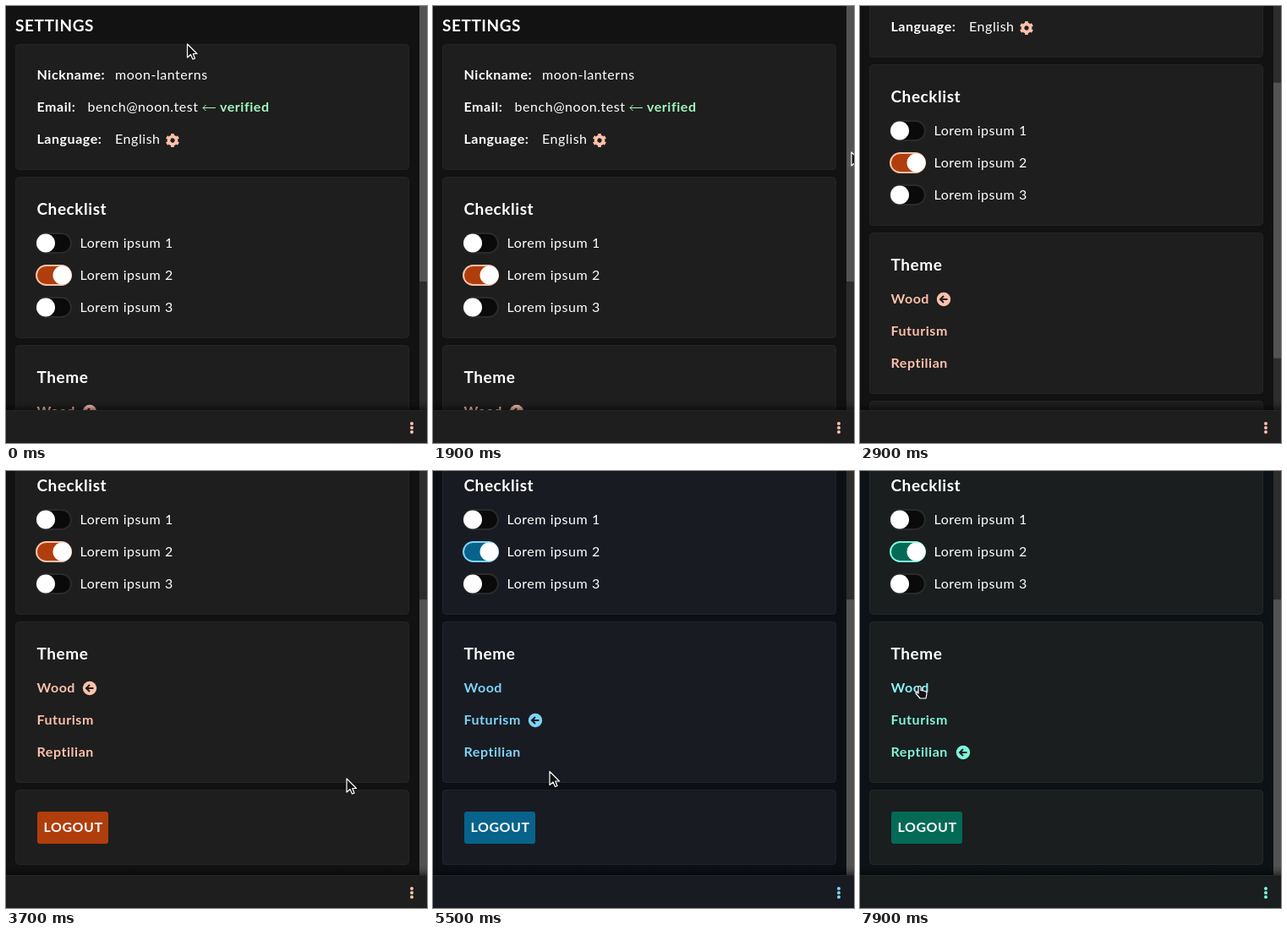
These frames come from a looping animation (498x517 px, 8 s). An HTML page:

```html
<!DOCTYPE html>
<html lang="en">
<head>
<meta charset="utf-8">
<title>Settings</title>
<style>
  html, body { margin: 0; width: 100%; height: 100%; overflow: hidden; background: #121212; }
  svg { display: block; width: 498px; height: 517px; background: var(--bg); }
  text { font: 16px Lato, sans-serif; letter-spacing: .55px; fill: #fff; white-space: pre; }
  .bold, .title, .link { font-weight: 700; }
  .title { font-size: 19px; }
  .link { fill: var(--accent); }
  .link.hover { fill: var(--hover); }
  .panel { fill: var(--panel); stroke: var(--line); }
  .accent { fill: var(--accent); }
  .main { fill: var(--main); }
  .track { fill: #0a0a0a; stroke: #2a2a2a; stroke-width: 2; }
  .track.on { fill: var(--main); stroke: var(--accent); }
  .verified { fill: #a3f7bf; }
  .cursor path { fill: #111; stroke: #fff; stroke-width: 1.2; stroke-linejoin: round; }
</style>
</head>
<body>
<svg id="stage" viewBox="0 0 498 517"></svg>
<script>
const LOOP = 8000, STEP = 100, VIEW = 478, CONTENT = 701;

const themes = {
  wood: { bg: '#121212', panel: '#1e1e1e', line: '#252525', main: '#b03e0d', accent: '#fdc1a9', hover: '#ffe1d3' },
  futurism: { bg: '#0c1015', panel: '#191b22', line: '#22252c', main: '#07638b', accent: '#7dd3f8', hover: '#b2e9ff' },
  reptilian: { bg: '#0c1215', panel: '#1a1e1e', line: '#232828', main: '#046a56', accent: '#7ff5dc', hover: '#8ff0ff' }
};
const links = [
  { name: 'Wood', right: 83, badge: 99, y: 480 },
  { name: 'Futurism', right: 104, badge: 121, y: 518 },
  { name: 'Reptilian', right: 106, badge: 122, y: 556 }
];

// [time, value...]
const scrollKeys = [[2200, 0], [2300, 40], [2400, 108], [2600, 108], [2700, 127],
  [2900, 133], [3100, 146], [3200, 170], [3400, 223]];
const cursorKeys = [[500, 214.5, 45], [1900, 495, 173], [2200, 495, 173], [2300, 500, 200],
  [3400, 500, 324], [3600, 497, 324], [3700, 403, 364], [4400, 74, 291], [4600, 72, 291],
  [5000, 150, 58], [5400, 144, 355], [5500, 138, 355.5], [6000, 80, 330], [6100, 80, 330],
  [6500, 186, 316], [7000, 160, 273], [7900, 70, 254.5]];

const linear = p => p;
const easeOut = p => 1 - (1 - p) ** 2;

function sample(keys, time, ease) {
  const next = keys.findIndex(key => key[0] > time);
  if (next === 0) return keys[0].slice(1);
  if (next < 0) return keys.at(-1).slice(1);
  const from = keys[next - 1], to = keys[next];
  const p = ease((time - from[0]) / (to[0] - from[0]));
  return from.slice(1).map((v, i) => v + (to[i + 1] - v) * p);
}

const text = (x, y, label, cls = '') => `<text class="${cls}" x="${x}" y="${y}">${label}</text>`;
const panel = (y, h) => `<rect class="panel" x="11.5" y="${y}" width="465" height="${h}" rx="4"/>`;
const toggle = (y, on, label) => `
  <rect class="track ${on ? 'on' : ''}" x="36" y="${y - 11.5}" width="41" height="23" rx="11.5"/>
  <circle cx="${on ? 66.5 : 47}" cy="${y}" r="11" fill="#fff"/>` + text(87.5, y + 5.5, label);

const gear = `<g transform="translate(197 159) rotate(15)" fill="none" stroke="var(--accent)">
  <circle r="4.5" stroke-width="3.8"/>
  <circle r="6.8" stroke-width="2.6" pathLength="12" stroke-dasharray="1 1"/></g>`;

const stage = document.getElementById('stage');
stage.innerHTML = `
  <defs><linearGradient id="shade" x2="0" y2="1">
    <stop stop-opacity="0"/><stop offset=".5" stop-opacity=".12"/><stop offset="1" stop-opacity=".45"/>
  </linearGradient></defs>
  <g id="content">
    ${text(11, 30, 'SETTINGS', 'title')}
    ${panel(45.5, 148)}${panel(202.5, 190)}${panel(401.5, 190)}${panel(600.5, 88)}
    ${text(36.5, 87, 'Nickname:', 'bold')}${text(129, 87, 'moon-lanterns')}
    ${text(36.5, 125, 'Email:', 'bold')}${text(96.5, 125, 'bench@noon.test')}
    <path d="M248 120.5H233m3.500-3.500l-3.500 3.500l3.500 3.500" fill="none" stroke="#a3f7bf"/>
    ${text(253, 125, 'verified', 'bold verified')}
    ${text(36.5, 163, 'Language:', 'bold')}${text(129, 163, 'English')}${gear}
    ${text(36.5, 247, 'Checklist', 'title')}
    ${[1, 2, 3].map(n => toggle(242.5 + 38 * n, n === 2, 'Lorem ipsum ' + n)).join('')}
    ${text(36.5, 446, 'Theme', 'title')}
    ${links.map(link => text(36.5, link.y + 5, link.name, 'link')).join('')}
    <g id="badge"><circle class="accent" r="8.2"/>
      <path d="M4.5 0H-4m4-4l-4 4l4 4" fill="none" stroke="var(--panel)" stroke-width="2"/></g>
    <rect class="main" x="37" y="626" width="84" height="38" rx="3"/>
    ${text(44.5, 650, 'LOGOUT', 'bold')}
  </g>
  <rect x="489" width="9" height="${VIEW}" fill="#2d2d2d"/>
  <rect id="thumb" x="489" width="9" height="326" fill="#535353"/>
  <rect y="466" width="498" height="12" fill="url(#shade)"/>
  <rect class="panel" x="-1" y="478.5" width="500" height="40"/>
  ${[494, 499, 504].map(y => `<circle class="accent" cx="480" cy="${y}" r="2"/>`).join('')}
  <g id="cursor" class="cursor">
    <path id="arrow" d="M0 0V16L4 12.5L6.5 18L9 17L6.8 11.5H11.5Z"/>
    <path id="hand" d="M-1 1q1.5-2 3 0v4l5 1q2 .5 2 3l-1 5.500h-7l-5-6q0-2 2-1l1 1z"/>
  </g>`;

const byId = id => document.getElementById(id);
const [content, badge, thumb, cursor, arrow, hand] =
  ['content', 'badge', 'thumb', 'cursor', 'arrow', 'hand'].map(byId);
const linkNodes = stage.querySelectorAll('.link');
const moveTo = (node, x, y) => node.setAttribute('transform', `translate(${x} ${y})`);

function draw(now) {
  const time = Math.floor(now % LOOP / STEP) * STEP;
  const [scroll] = sample(scrollKeys, time, linear);
  const [x, y] = sample(cursorKeys, time, easeOut);
  const active = time < 4600 ? 0 : time < 6200 ? 1 : 2;

  const theme = themes[links[active].name.toLowerCase()];
  for (const key in theme) stage.style.setProperty('--' + key, theme[key]);

  moveTo(content, 0, -scroll);
  moveTo(badge, links[active].badge, links[active].y);
  thumb.setAttribute('y', scroll * VIEW / CONTENT);

  let hovering = false;
  links.forEach((link, i) => {
    const hit = x > 36 && x < link.right && Math.abs(y + scroll - link.y) < 10;
    linkNodes[i].classList.toggle('hover', hit);
    hovering ||= hit;
  });
  moveTo(cursor, x, y);
  arrow.style.display = hovering ? 'none' : '';
  hand.style.display = hovering ? '' : 'none';
}

const start = performance.now();
function tick() {
  draw(performance.now() - start);
  requestAnimationFrame(tick);
}
tick();
</script>
</body>
</html>
```
